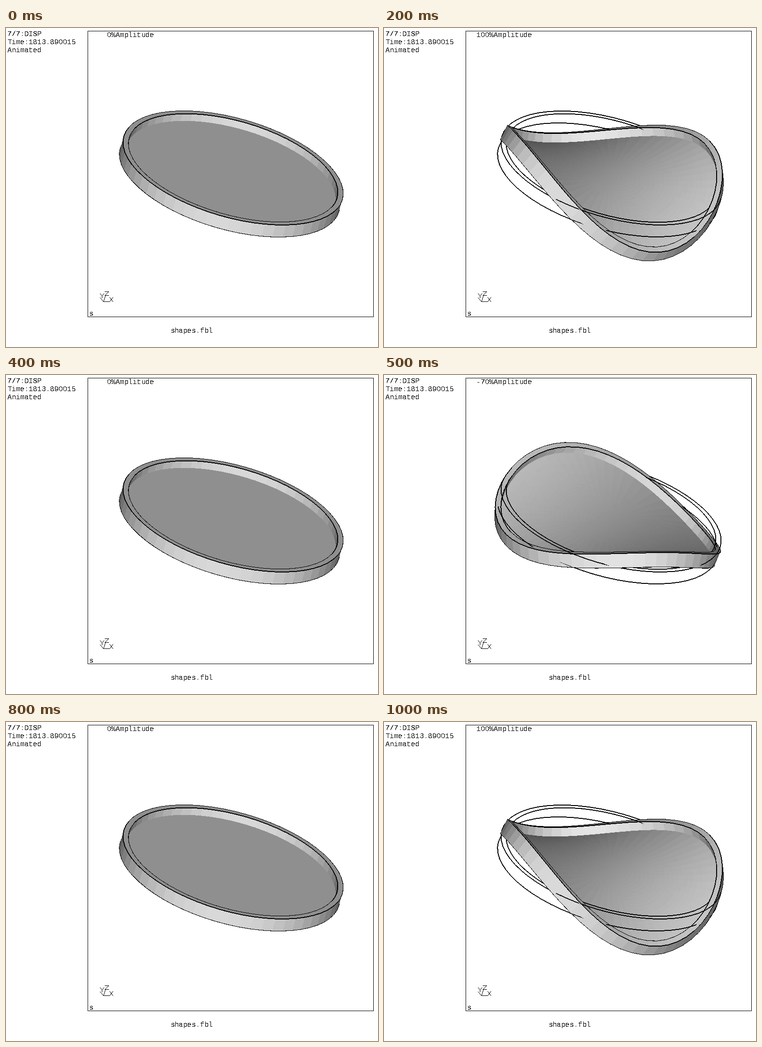
A matplotlib script that plays this animation: 784x672 px, repeating every 1.1 s.

```python
import matplotlib.pyplot as plt
import numpy as np
from matplotlib.animation import FuncAnimation

W, H = 784, 672
plt.rcParams.update({
    "font.family": "Liberation Mono", "font.size": 15,
    "text.antialiased": False, "text.hinting": "force_autohint",
    "text.hinting_factor": 1,
})

# Dish: a flat plate with a raised rim, seen in parallel projection
R_OUT, R_IN = 239.7, 228.3
FLOOR, BASE = -17.3, -29.0
MID = (FLOOR + BASE) / 2
SECTORS = 60
CX, CY = 478.5, 294.9
ROLL = np.radians(16.2)
COS_T = 0.433
SIN_T = np.sqrt(1 - COS_T ** 2)
VIEW = np.array([0, SIN_T, COS_T])

# Bending mode with two nodal diameters
BEND = 60.0
MODE_DIR = np.radians(56.2)

THETA = np.linspace(0, 2 * np.pi, SECTORS + 1)
PROFILE = np.array(
    [(r, BASE) for r in np.linspace(0, R_OUT, 12)]
    + [(R_OUT, 0), (R_IN, 0)]
    + [(r, FLOOR) for r in np.linspace(R_IN, 0, 24)])
EDGES = [(R_OUT, 0), (R_IN, 0), (R_OUT, BASE)]

FRAME = [(172, 6), (774, 6), (774, 608), (172, 608), (172, 6)]
TRIAD = [
    [(198, 568), (205, 576), (217, 576)],               # axes
    [(205, 576), (209, 564)],
    [(198, 559), (202, 564), (206, 559)],               # Y
    [(202, 564), (202, 568)],
    [(208, 555), (216, 555), (208, 563), (216, 563)],   # Z
    [(218, 567), (225, 576)],                           # X
    [(225, 567), (218, 576)],
]


def ring(r, z, amp):
    """Points of one circle of the dish, bent by amp."""
    u, v = r * np.cos(THETA), r * np.sin(THETA)
    c, s = np.cos(MODE_DIR), np.sin(MODE_DIR)
    p, q = c * u + s * v, c * v - s * u
    k = -amp * BEND / R_OUT ** 2
    lift = k * (p * p - q * q)
    gp, gq = 2 * k * p, -2 * k * q
    arm = z - MID
    return np.stack([u - arm * (c * gp - s * gq),
                     v - arm * (s * gp + c * gq),
                     z + lift], axis=-1)


def project(pts):
    """Screen x, screen y and nearness to the viewer."""
    u, v, w = np.moveaxis(pts, -1, 0)
    s = COS_T * v - SIN_T * w
    return np.stack([CX + np.cos(ROLL) * u - np.sin(ROLL) * s,
                     CY + np.sin(ROLL) * u + np.cos(ROLL) * s,
                     pts @ VIEW], axis=-1)


def fill(img, near, tri, gray):
    (ax, ay, az), (bx, by, bz), (cx, cy, cz) = tri.tolist()
    area = (bx - ax) * (cy - ay) - (by - ay) * (cx - ax)
    if abs(area) < 1e-9:
        return
    x0, x1 = int(min(ax, bx, cx)), int(max(ax, bx, cx)) + 1
    y0, y1 = int(min(ay, by, cy)), int(max(ay, by, cy)) + 1
    dx = np.arange(x0, x1) + 0.5 - ax
    dy = np.arange(y0, y1)[:, None] + 0.5 - ay
    s = (dx * (cy - ay) - dy * (cx - ax)) / area
    t = (dy * (bx - ax) - dx * (by - ay)) / area
    z = az + s * (bz - az) + t * (cz - az)
    box = np.s_[y0:y1, x0:x1]
    hit = (s >= -1e-9) & (t >= -1e-9) & (s + t <= 1 + 1e-9) & (z > near[box])
    img[box][hit] = gray
    near[box][hit] = z[hit]


def stroke(img, near, pts):
    """Two pixel wide line, hidden where the dish is nearer."""
    at = np.linspace(0, SECTORS, SECTORS * 200, endpoint=False)
    x, y, z = (np.interp(at, np.arange(SECTORS + 1), c) for c in pts.T)
    flat = np.abs(np.gradient(x)) >= np.abs(np.gradient(y))
    major = np.where(flat, x, y)
    keep = np.abs(major % 1 - 0.5) < 0.08
    x, y, z, flat = x[keep], y[keep], z[keep], flat[keep]
    for side in (-0.5, 0.5):
        col = np.floor(np.where(flat, x, x + side)).astype(int)
        row = np.floor(np.where(flat, y + side, y)).astype(int)
        seen = z >= near[row, col] - 0.05
        img[row[seen], col[seen]] = 0


def hairline(img, pts):
    """One pixel wide open path."""
    for (x0, y0), (x1, y1) in zip(pts, pts[1:]):
        n = max(abs(x1 - x0), abs(y1 - y0)) + 1
        col = np.rint(np.linspace(x0, x1, n)).astype(int)
        row = np.rint(np.linspace(y0, y1, n)).astype(int)
        img[row, col] = 0


def render(amp):
    img = np.full((H, W), 255, np.uint8)
    near = np.full((H, W), -1e9)
    for path in [FRAME] + TRIAD:
        hairline(img, path)
    solid = np.array([ring(r, z, amp) for r, z in PROFILE])
    a, b = solid[:-1, :-1], solid[:-1, 1:]
    c, d = solid[1:, 1:], solid[1:, :-1]
    normal = np.cross(c - a, d - b)
    normal /= np.linalg.norm(normal, axis=-1, keepdims=True) + 1e-12
    shade = np.rint(75.5 + 156 * np.abs(normal @ VIEW))
    flat = project(solid)
    for i, j in np.ndindex(shade.shape):
        a, b = flat[i, j], flat[i, j + 1]
        c, d = flat[i + 1, j + 1], flat[i + 1, j]
        fill(img, near, np.array([a, b, c]), shade[i, j])
        fill(img, near, np.array([a, c, d]), shade[i, j])
    for bent in {0, amp}:
        for r, z in EDGES:
            stroke(img, near, project(ring(r, z, bent)))
    return img


STEPS = 8
LEVELS = [round(np.sin(2 * np.pi * k / STEPS), 6) for k in range(STEPS)]
VIEWS = [render(level) for level in LEVELS]

fig = plt.figure(figsize=(W / 72, H / 72), dpi=72, facecolor="white")
ax = fig.add_axes([0, 0, 1, 1])
ax.axis("off")
picture = ax.imshow(VIEWS[0], cmap="gray", vmin=0, vmax=255, aspect="auto",
                    extent=(0, W, H, 0), interpolation="nearest")
ax.set_xlim(0, W)
ax.set_ylim(H, 0)


def plain(s):
    # the display's zero has no dot
    return s.replace("0", "O")


def label(x, y, s, **kw):
    return ax.text(x, y, plain(s), va="baseline", color="black", **kw)


label(3, 17, "7/7:DISP")
label(3, 34, "Time:1813.890015")
label(3, 51, "Animated")
label(175, 606, "s")
label(347, 642, "shapes.fbl")
amount = label(312, 19, "0%Amplitude", ha="right")


def update(k):
    step = k % STEPS
    picture.set_data(VIEWS[step])
    amount.set_text(plain(f"{int(100 * LEVELS[step])}%Amplitude"))
    return picture, amount


anim = FuncAnimation(fig, update, frames=11, interval=100,
                     repeat=True, repeat_delay=0, blit=False)
plt.show()
```
